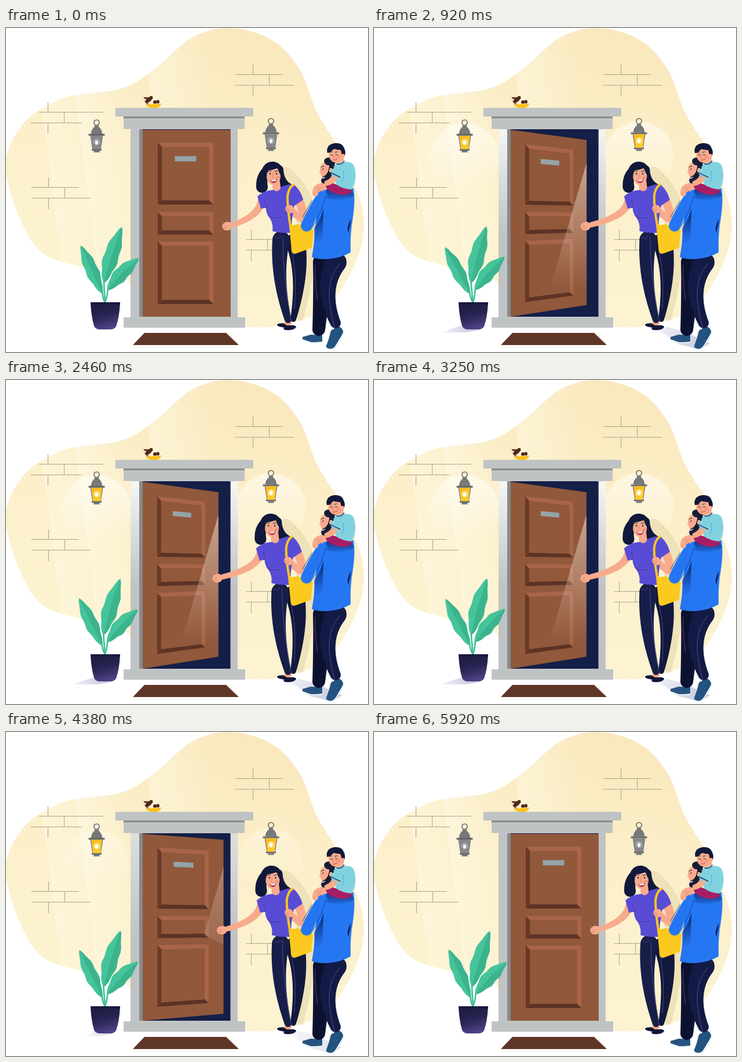
Write an HTML page with a canvas that moves like this. It is 625 px wide and 560 px high and loops after 5.96 s.

```html
<!DOCTYPE html>
<html lang="en">
<head>
<meta charset="utf-8">
<title>Welcome home</title>
<style>
html, body { margin: 0; width: 100%; height: 100%; overflow: hidden; background: #fff; }
canvas { display: block; width: 625px; height: 560px; }
</style>
</head>
<body>
<canvas id="stage" width="625" height="560"></canvas>
<script>
const ctx = document.getElementById('stage').getContext('2d');
const LOOP = 5960;
const NAVY = '#11183b', SKIN = '#f7ab8c', BLUSH = 'rgba(239,107,94,.5)';
const STONE = '#c0c3c3', STONE_DARK = '#858b8b';
const WOOD = '#91583b', WOOD_DARK = '#5c3325', WOOD_LIGHT = '#a8654a';

const clamp = v => Math.max(0, Math.min(1, v));
const ease = v => { v = clamp(v); return v * v * (3 - 2 * v); };
const taper = (a, b) => t => a + (b - a) * t;

function group(draw) {
  ctx.save();
  draw();
  ctx.restore();
}

function fade(alpha, draw) {
  if (alpha > 0) group(() => { ctx.globalAlpha = alpha; draw(); });
}

function poly(fill, ...p) {
  ctx.beginPath();
  for (let i = 0; i < p.length; i += 2) ctx.lineTo(p[i], p[i + 1]);
  ctx.fillStyle = fill;
  ctx.fill();
}

function shape(fill, d) {
  ctx.fillStyle = fill;
  ctx.fill(new Path2D(d));
}

function line(color, width, d) {
  ctx.strokeStyle = color;
  ctx.lineWidth = width;
  ctx.lineCap = ctx.lineJoin = 'round';
  ctx.stroke(new Path2D(d));
}

function oval(fill, x, y, rx, ry = rx, turn = 0) {
  ctx.beginPath();
  ctx.ellipse(x, y, rx, ry, turn, 0, 7);
  ctx.fillStyle = fill;
  ctx.fill();
}

function rect(fill, x, y, w, h) {
  ctx.fillStyle = fill;
  ctx.fillRect(x, y, w, h);
}

function grad(x0, y0, x1, y1, ...colors) {
  const g = ctx.createLinearGradient(x0, y0, x1, y1);
  colors.forEach((c, i) => g.addColorStop(i / (colors.length - 1), c));
  return g;
}

// band of half-width w(t) along a quadratic curve; left = 0 keeps the right half only
function ribbon(fill, x0, y0, cx, cy, x1, y1, w, left = 1) {
  const a = [], b = [];
  for (let i = 0; i <= 30; i++) {
    const t = i / 30, s = 1 - t;
    const x = s * s * x0 + 2 * s * t * cx + t * t * x1;
    const y = s * s * y0 + 2 * s * t * cy + t * t * y1;
    const dx = s * (cx - x0) + t * (x1 - cx), dy = s * (cy - y0) + t * (y1 - cy);
    const k = w(t) / Math.hypot(dx, dy);
    a.push(x + dy * k * left, y - dx * k);
    if (!left) a.splice(-2, 2, x, y);
    b.unshift(x - dy * k, y + dx * k);
  }
  poly(fill, ...a, ...b);
}

// ribbon with round ends
function limb(fill, x0, y0, cx, cy, x1, y1, w0, w1) {
  ribbon(fill, x0, y0, cx, cy, x1, y1, taper(w0, w1));
  oval(fill, x0, y0, w0);
  oval(fill, x1, y1, w1);
}

// closed smooth curve through the points
function trace(...p) {
  const n = p.length / 2;
  const at = i => p.slice((i + n) % n * 2, (i + n) % n * 2 + 2);
  ctx.beginPath();
  ctx.moveTo(p[0], p[1]);
  for (let i = 0; i < n; i++) {
    const [a, b, c, d] = [at(i - 1), at(i), at(i + 1), at(i + 2)];
    ctx.bezierCurveTo(b[0] + (c[0] - a[0]) / 6, b[1] + (c[1] - a[1]) / 6,
      c[0] - (d[0] - b[0]) / 6, c[1] - (d[1] - b[1]) / 6, c[0], c[1]);
  }
}

// two courses of bricks with joints at a and a + 28
function bricks(x, y, w, x2, w2, a) {
  line('#aaa28e', 1, `M${x} ${y}h${w}M${x2} ${y + 18.5}h${w2}` +
    `M${a} ${y - 17}v17M${a + 28} ${y}v18M${a} ${y + 19}v18`);
}

function wall() {
  group(() => {
    trace(0, 250, 28, 168, 100, 121, 202, 104, 264, 65, 320, 17, 385, 0, 456, 19, 506, 70, 538, 148,
      582, 222, 617, 325, 603, 407, 552, 483, 480, 513, 400, 514, 260, 480, 190, 421, 130, 413, 50, 376);
    ctx.clip();
    rect(grad(400, 0, 300, 500, '#f9e8bc', '#fcf0cb', '#fdf3d2'), 0, 0, 625, 560);
    for (const x of [45, 105, 235]) {
      poly(grad(x, 0, x + 120, 0, 'rgba(255,252,238,.5)', 'rgba(255,252,238,0)'),
        x, 0, x + 110, 0, x + 180, 560, x + 70, 560);
    }
  });
  bricks(396, 80.5, 82, 396, 101, 426.5);
  bricks(57, 145.5, 111, 43, 87, 72.5);
  bricks(44, 275.5, 81, 44, 102, 73.5);
  bricks(415, 365.5, 44, 415, 44, 423.5);
}

function glow(x, y, p) {
  const r = 48 + 12 * p;
  fade(p, () => oval(grad(0, y - r, 0, y + r, 'rgba(255,254,248,.6)', 'rgba(255,254,248,0)'), x, y, r));
}

function lamp(x, y, lit) {
  const glass = (fill, s) => poly(fill, -11 * s, 28, 11 * s, 28, 7.5 * s, 52, -7.5 * s, 52);
  group(() => {
    ctx.translate(x, y);
    line('#77787a', 1.8, 'M-4.6 5.5a4.6 4.6 0 1 0 9.2 0a4.6 4.6 0 1 0 -9.2 0');
    shape('#77787a', 'M-3 10H3L4 13Q9 17 10 25H-10Q-9 17-4 13Z');
    rect('#66686b', -14, 25, 28, 3);
    glass('#85878a', 1);
    oval('#a3a5a7', 0, 39, 6);
    fade(lit, () => {
      glass(grad(-9, 28, 9, 50, '#f6b51b', '#ffd02f'), 0.85);
      oval('rgba(255,239,170,.75)', 0, 39, 5.5);
    });
    oval('#fff', 0, 40, 2.4, 3.4);
    rect('#66686b', -8.5, 51.5, 17, 2.5);
    rect('#77787a', -5, 54, 10, 3);
  });
}

function frame(p) {
  rect(STONE, 189, 138, 238, 15);
  rect(STONE_DARK, 203, 153, 209, 3);
  rect(STONE, 203, 156, 209, 18.5);
  rect(STONE, 215, 174, 185, 327);
  rect(STONE_DARK, 230, 175, 6, 324);
  fade(p, () => {
    const shine = grad(0, 175, 0, 360, 'rgba(255,255,255,.85)', 'rgba(255,255,255,0)');
    rect(shine, 215, 175, 15, 185);
    rect(shine, 388, 175, 12, 185);
  });
  rect(STONE, 203, 500, 210, 18);
  rect('#141f47', 236, 175, 151.5, 324);
}

function door(p) {
  // perspective of a leaf hinged on the left
  const at = (x, y) => {
    const u = x - 236, s = 1 / (1 + 0.136 * p * u / 152);
    return [236 + u * (1 - 0.02 * p) * s, 326 + (y - 326) * s];
  };
  const face = (fill, ...q) => {
    const out = [];
    for (let i = 0; i < q.length; i += 2) out.push(...at(q[i], q[i + 1]));
    poly(fill, ...out);
  };
  const slab = (fill, l, t, r, b) => face(fill, l, t, r, t, r, b, l, b);
  slab(WOOD, 236, 176, 387.5, 499);
  for (const [t, b] of [[198, 305], [318, 357], [369, 477]]) {
    const l = 262, r = 358, d = 7.5;
    slab(WOOD_LIGHT, l, t, r, b);
    face('#673a29', l, t, l + d, t + d, l + d, b - d, l, b);
    face(WOOD_DARK, l, b, l + d, b - d, r - d, b - d, r, b);
    slab(WOOD, l + d, t + d, r - d, b - d);
  }
  slab('#94a4a9', 291.5, 221.5, 328.5, 230.5);
  const x = at(387.5, 0)[0];
  fade(p, () => poly(grad(0, 235, 0, 455, 'rgba(255,240,228,.5)', 'rgba(255,230,212,.28)', 'rgba(255,230,212,0)'),
    x, 233, x - 62 * p, 240 + 205 * p, x, 250 + 215 * p));
}

function nest() {
  const brown = '#51291c';
  line(brown, 1.2, 'M245 128v6M242 128l2 6');
  oval(brown, 246, 124.5, 7, 3.6, -0.6);
  oval(brown, 250.5, 120.5, 3);
  line(brown, 2.5, 'M239 121L246 121');
  oval(brown, 257, 128, 3);
  oval(brown, 262, 127.5, 3);
  shape('#fdc11b', 'M242 131Q255 133 268 130Q267 137 260 138H250Q245 137 242 131Z');
}

// leaf on a stem, turned about the top of the pot
function leaf(turn, size, x0, y0, cx, cy, x1, y1) {
  const width = t => size * Math.sin(Math.PI * t) ** 0.75 * (1 + 0.08 * Math.sin(20 * t));
  group(() => {
    ctx.translate(171, 473);
    ctx.rotate(turn);
    ctx.translate(-171, -473);
    line('#3fbf97', 2.6, `M${x0} ${y0 - 6}Q${x0} ${y0 + 6} 171 475`);
    ribbon('#45c49c', x0, y0, cx, cy, x1, y1, width);
    ribbon('#3bb48e', x0, y0, cx, cy, x1, y1, width, 0);
  });
}

function plant(t, p) {
  const x = 160 - 42 * p;
  fade(p, () => shape(grad(x, 0, 180, 0, '#eeeef7', '#c3c5de'),
    `M${x} 526Q${x + 20} 517 150 515L185 520Q168 528 ${x} 526Z`));
  // three sways per loop
  const sway = (1 - Math.cos(t / LOOP * 6 * Math.PI)) / 2;
  leaf(-0.068 * sway, 11, 166, 459, 148, 418, 129, 376);
  leaf(-0.046 * sway, 13, 169, 441, 179, 397, 200, 344);
  leaf(-0.048 * sway, 12, 176, 453, 196, 424, 229, 398);
  shape(grad(165, 474, 178, 521, '#191b3f', '#2a2654', '#54458a'),
    'M146 474H197Q196 499 190 516Q187 521 180 521H162Q155 521 152 515Q147 498 146 474Z');
  rect('#171a3d', 146, 474, 51, 4);
}

function woman(p) {
  // the lean grows with the height above the shoes
  const lean = 0.0107 * p;
  ctx.transform(1, 0, lean, 1, -515 * lean, 0);
  // hair
  oval(NAVY, 460, 248, 18, 17);
  limb(NAVY, 450, 247, 440, 258, 442, 275, 8, 10);
  limb(NAVY, 471, 245, 472, 266, 487, 276, 8, 8);
  // legs and shoes
  oval(NAVY, 479, 514, 11, 3.5, 0.1);
  oval(NAVY, 490, 518, 11, 4, -0.15);
  oval(SKIN, 487, 510, 6, 4);
  limb(NAVY, 500, 371, 514, 425, 496, 503, 17, 5);
  limb('#171e48', 475, 366, 466, 430, 487, 504, 15, 6);
  line('#554a9e', 0.9, 'M478 360Q478 430 492 506M464 361Q472 367 474 359M494 388Q503 430 498 485');
  // far arm
  const hand = -15 * p;
  limb(SKIN, 441, 301, 434, 326, 392 + hand, 340, 7, 4.5);
  oval(SKIN, 382 + hand, 342.5, 9, 7.5, -0.2);
  line('#d77d66', 0.8, `M${375 + hand} 342h6m-6 4h7`);
  // near arm
  limb(SKIN, 505, 298, 516, 318, 510, 330, 8, 6);
  limb(SKIN, 510, 330, 500, 322, 488, 313, 6, 6);
  // shirt
  shape('#584cd4', 'M434 291Q446 281 460 280L480 273Q492 268 499 272Q510 283 513 297L498 307' +
    'Q493 330 492 354Q475 355 460 351Q462 338 455 328Q448 319 449 311L440 312Z');
  line('#4238a4', 1, 'M449 311Q449 302 446 297M453 324Q462 331 474 327');
  // neck and face
  limb(SKIN, 467, 266, 467, 272, 467, 275, 6, 7);
  oval(SKIN, 462, 256, 12, 15, 0.1);
  shape(NAVY, 'M446 253Q448 234 462 234Q477 234 478 260Q471 251 469 242Q459 246 452 246Q450 252 446 253Z');
  for (const x of [456, 467]) {
    oval(NAVY, x, 252, 1.1, 1.4);
    line(NAVY, 0.9, `M${x - 3} 248l5 -1`);
  }
  line('#db7d68', 0.9, 'M461 252l-2 6l3 1');
  shape('#b02e45', 'M456 262Q462 264 468 260Q468 267 462 268Q457 267 456 262Z');
  shape('#fff', 'M457 262Q462 264 467 261L466 264Q461 266 458 264Z');
  oval(BLUSH, 470, 258, 2.6, 2);
  // bag
  line('#fbc91d', 4, 'M490 336Q486 311 486 291Q488 276 496 271');
  shape('#fbc91d', 'M487 325L493 341L505 339L531 349L528 380L500 390Q495 391 493 386Q491 359 487 325Z');
  oval(SKIN, 490, 313, 8, 7, 0.6);
  line('#d77d66', 0.8, 'M483 312l7 2m-6 2l7 2');
}

function man() {
  // shoes
  shape('#24537f', 'M512 534Q519 532 526 530L546 531L546 542L530 544L512 538Z');
  line('#e4edf5', 1.8, 'M512 540Q522 546 546 543');
  shape('#24537f', 'M553 549Q558 537 561 523L574 515Q583 520 582 527Q575 539 567 552Q561 557 553 552Z');
  line('#e4edf5', 1.8, 'M554 554Q562 558 568 552Q577 541 582 528');
  // trousers
  limb('#0b112e', 547, 405, 545, 460, 540, 521, 17, 11);
  limb('#131a45', 570, 405, 542, 450, 569, 510, 18, 9);
  line('#6a4a93', 0.9, 'M576 408Q545 440 567 516M534 410Q532 440 538 470');
  // head
  oval(SKIN, 550, 246, 8, 13);
  poly(SKIN, 544, 241, 540.5, 249, 545, 251);
  oval('#1a1c38', 559, 231, 10, 7, 0.2);
  limb('#1a1c38', 563, 238, 563, 256, 551, 263, 5, 7);
  oval('#1a1c38', 547, 244, 1);
  line('#1a1c38', 1, 'M544 240l5 -1');
  line('#fff', 1.4, 'M544 259q3 2 6 -1');
  oval(SKIN, 561, 246, 3, 4);
  // jacket
  shape('#2476f2', 'M538 287Q548 277 563 278L600 277Q604 300 597 340Q594 365 595 388' +
    'Q576 398 558 399Q541 401 528 396Q533 370 533 349Q537 328 538 287Z');
  ribbon(grad(0, 278, 0, 302, 'rgba(16,44,120,.85)', 'rgba(16,44,120,0)'), 552, 285, 575, 293, 598, 283, taper(8, 8));
  shape(grad(535, 320, 546, 372, 'rgba(12,31,92,.9)', 'rgba(18,53,140,0)'),
    'M548 312Q542 335 532 346Q533 370 529 387Q547 383 547 350Z');
  limb('#2476f2', 546, 290, 532, 312, 519, 342, 9, 10);
  line('#124099', 0.9, 'M553 290Q546 314 530 344M512 327L528 299');
  shape('#10235b', 'M596 330Q587 344 591 354Q594 343 596 330Z');
  // hands on the child's foot
  limb(SKIN, 534, 286, 534, 276, 545, 275, 5, 7);
  line('#d77d66', 0.8, 'M538 276l8 -1m-9 5l8 0');
}

function child(p) {
  ctx.translate(575, 280);
  ctx.rotate(-0.014 * p);
  ctx.translate(-575, -280);
  limb('#a61f62', 559, 273, 572, 282, 588, 279, 7, 9);
  limb(SKIN, 575, 225, 577, 232, 578, 236, 7, 7);
  shape('#81d2df', 'M566 239Q576 229 593 232Q602 234 603 248Q606 263 597 279Q583 279 571 271L567 263Z');
  limb(SKIN, 570, 252, 566, 264, 554, 268, 6, 4.5);
  limb('#81d2df', 575, 242, 572, 248, 569, 250, 7, 8);
  line('#27366e', 1.4, 'M561 250l16 8M571 235Q580 237 584 230');
  line('#4ca6bb', 0.9, 'M582 247Q586 258 580 266');
  // head
  oval(SKIN, 571, 220, 13.5, 13, 0.4);
  shape(NAVY, 'M554 211Q556 200 568 199Q581 198 584 208Q587 214 585 220L580 219L578 211Q570 210 566 209Q560 216 555 216Z');
  oval(SKIN, 582, 221, 2.6, 3.4);
  for (const x of [562, 571]) line(NAVY, 0.9, `M${x - 2} 219q2 2 4 0m-5 -4l4 -1`);
  line('#d97765', 0.9, 'M566 219l-2 5h3');
  line('#b33c4c', 1, 'M565 228q4 1 7 -2');
  oval(BLUSH, 575, 223, 2.6, 2);
}

function people(p) {
  fade(p, () => shape(grad(490, 518, 570, 550, '#f0f0f7', '#c6c8df'),
    'M488 521L507 517L535 524L580 545L560 557Q542 549 526 547L512 536Z'));
  // shade on the wall
  limb('#efe2b8', 482, 253, 500, 270, 512, 300, 13, 18);
  limb('#efe2b8', 512, 300, 530, 400, 508, 500, 18, 6);
  group(() => woman(p));
  man();
  group(() => child(p));
}

function draw(t) {
  const p = ease(t / 1000) * (1 - ease((t - 3990) / 830));
  rect('#fff', 0, 0, 625, 560);
  wall();
  for (const [x, y] of [[156.5, 158], [457.5, 155.5]]) {
    glow(x, y + 66, p);
    lamp(x, y, clamp(p * 2.1));
  }
  frame(p);
  door(p);
  nest();
  poly('#603627', 239, 527, 380, 527, 402, 548, 219, 548);
  plant(t, p);
  people(p);
}

let start;
function tick(now) {
  start ??= now;
  draw((now - start) % LOOP);
  requestAnimationFrame(tick);
}
draw(0);
requestAnimationFrame(tick);
</script>
</body>
</html>
```
